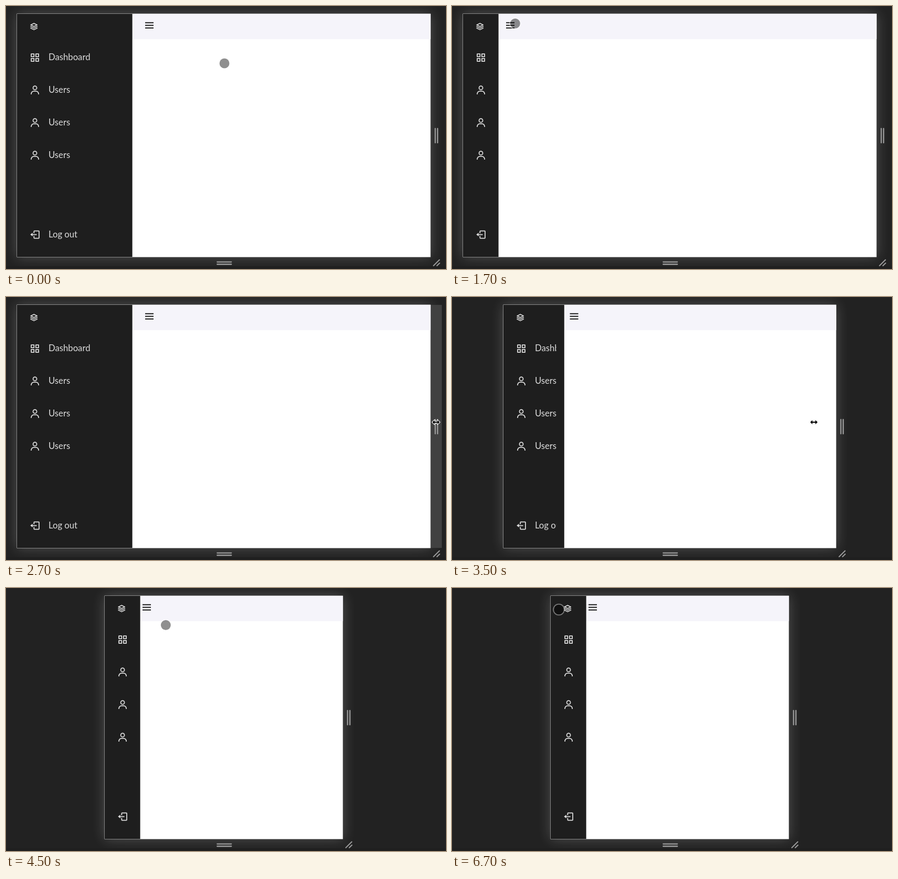
Recreate the animation shown at these times as an HTML page with a canvas. Size 838 by 500 pixels, loop 7.3 s.

```html
<!DOCTYPE html>
<html lang="en">
<head>
<meta charset="utf-8">
<title>Responsive sidebar</title>
<style>
  html, body { margin: 0; width: 100%; height: 100%; overflow: hidden; background: #222; }
  canvas { display: block; width: 838px; height: 500px; }
</style>
</head>
<body>
<canvas id="stage"></canvas>
<script>
const W = 838, H = 500, LOOP = 7300, STEP = 100;
const TOP = 15, BOTTOM = 477, BAR = 48, GRIP = 21, FLOOR = 495;
const EDGE = .4; // the page starts between two pixels
const DARK = '#1e1e1e', LIGHT = '#dcdcdc', METAL = '#9b9b9b';

const canvas = document.getElementById('stage');
const ctx = canvas.getContext('2d');
const dpr = window.devicePixelRatio || 1;
canvas.width = W * dpr;
canvas.height = H * dpr;

// 24-unit icons
const tile = (x, y) =>
  `M${x + 1} ${y}h6a1 1 0 0 1 1 1v6a1 1 0 0 1-1 1h-6a1 1 0 0 1-1-1v-6a1 1 0 0 1 1-1z` +
  `M${x + 2} ${y + 2}v4h4v-4z`;
const icons = {
  grid: new Path2D(tile(3, 3) + tile(13, 3) + tile(3, 13) + tile(13, 13)),
  user: new Path2D('M12 2a5 5 0 1 0 5 5 5 5 0 0 0-5-5zm0 8a3 3 0 1 1 3-3 3 3 0 0 1-3 3z' +
    'm9 11v-1a7 7 0 0 0-7-7h-4a7 7 0 0 0-7 7v1h2v-1a5 5 0 0 1 5-5h4a5 5 0 0 1 5 5v1z'),
  exit: new Path2D('M20 3h-9a2 2 0 0 0-2 2v4h2V5h9v14h-9v-4H9v4a2 2 0 0 0 2 2h9' +
    'a2 2 0 0 0 2-2V5a2 2 0 0 0-2-2zM2 12l5 4v-3h9v-2H7V8z'),
  menu: new Path2D('M4 6h16v2H4zM4 11h16v2H4zM4 16h16v2H4z')
};

const rowY = i => 98 + 62 * i;
const items = [
  ['grid', 'Dashboard', rowY(0)],
  ['user', 'Users', rowY(1)],
  ['user', 'Users', rowY(2)],
  ['user', 'Users', rowY(3)],
  ['exit', 'Log out', 434.5]
];

const mix = (a, b, p) => a + (b - a) * p;

function smooth(x) {
  const p = Math.min(1, Math.max(0, x));
  return p * p * (3 - 2 * p);
}

// CSS "ease": cubic-bezier(.25, .1, .25, 1)
function ease(x) {
  if (x <= 0) return 0;
  if (x >= 1) return 1;
  const bez = (a, b, u) => 3 * a * u * (1 - u) ** 2 + 3 * b * u * u * (1 - u) + u ** 3;
  let lo = 0, hi = 1;
  for (let i = 0; i < 24; i++) {
    const mid = (lo + hi) / 2;
    if (bez(.25, .25, mid) < x) lo = mid; else hi = mid;
  }
  return bez(.1, 1, lo);
}

// Each move: start, end, goal
const pointer = { from: [416, 109], curve: smooth, moves: [
  [0, 500, [265, 38]],
  [700, 900, [272, 38]],
  [1150, 1800, [110, 33]],
  [2000, 2700, [819, 238]],
  [3000, 3720, [652, 238]],
  [3900, 4650, [264, 51]],
  [4650, 5000, [260, 38]],
  [5400, 5980, [203.5, 41]]
] };

// Sidebar width and menu padding
const layout = { from: [220, 24], curve: ease, moves: [
  [1150, 1650, [68, 14]],
  [2050, 2550, [220, 24]],
  [3300, 3800, [68, 4]],
  [5000, 5400, [0, 4]],
  [6250, 6700, [68, 4]]
] };

const follow = ({ from, curve, moves }, t) => moves.reduce((now, [start, end, goal]) => {
  const p = curve((t - start) / (end - start));
  return now.map((v, i) => mix(v, goal[i], p));
}, from);

function rect(x, y, w, h, color) {
  ctx.fillStyle = color;
  ctx.fillRect(x, y, w, h);
}

function clipped(x, y, w, h, paint) {
  ctx.save();
  ctx.beginPath();
  ctx.rect(x, y, w, h);
  ctx.clip();
  paint();
  ctx.restore();
}

function icon(name, x, y, scale, color) {
  ctx.save();
  ctx.translate(x, y);
  ctx.scale(scale, scale);
  ctx.fillStyle = color;
  ctx.fill(icons[name], 'evenodd');
  ctx.restore();
}

function line(color, width, ...points) {
  ctx.strokeStyle = color;
  ctx.lineWidth = width;
  ctx.beginPath();
  points.forEach(([x, y]) => ctx.lineTo(x, y));
  ctx.stroke();
}

function layers(x, y) {
  ctx.lineJoin = 'round';
  ctx.lineCap = 'round';
  line(LIGHT, 1.7, [x - 6, y - 3], [x, y - 6], [x + 6, y - 3], [x, y], [x - 6, y - 3], [x, y - 6]);
  for (const d of [0, 3]) line(LIGHT, 1.6, [x - 6.2, y + d], [x, y + 3.1 + d], [x + 6.2, y + d]);
}

function frame(left, right, hover) {
  rect(0, 0, W, H, '#222');
  clipped(0, 0, right + GRIP, FLOOR, () => {
    ctx.shadowColor = 'rgba(255,255,255,.22)';
    ctx.shadowBlur = 24 * dpr;
    rect(left, TOP, right - left, BOTTOM - TOP, '#222');
  });
  rect(0, FLOOR, W, H - FLOOR, '#1f1f1f');
  if (hover) rect(right, TOP, GRIP, BOTTOM - TOP, '#414141');

  ctx.lineCap = 'round';
  for (const d of [8.5, 13]) line(METAL, 2.3, [right + d, 233], [right + d, 260]);
  for (const y of [486.6, 491]) line(METAL, 2.3, [402.2, y], [429.2, y]);
  line(METAL, 2, [right + 5.2, 493.8], [right + 16.5, 482.5]);
  line(METAL, 2, [right + 11.7, 493.8], [right + 16.8, 488.7]);
}

function page(left, right, main) {
  rect(left - EDGE, TOP - EDGE, right - left, BOTTOM - TOP + 2 * EDGE, '#fff');
  rect(main, TOP, right - EDGE - main, BAR, '#f5f4fa');
}

function sidebar(left, width) {
  rect(left, TOP, Math.max(0, width - EDGE), BOTTOM - TOP, DARK);
  clipped(left, TOP, width, BOTTOM - TOP, () => {
    layers(left + 32.2, 39);
    for (const [name, , y] of items) icon(name, left + 23.5, y - 10.5, .88, LIGHT);
  });
  clipped(left, TOP, Math.max(0, width - 15.5), BOTTOM - TOP, () => {
    ctx.font = '16.7px Lato, "Open Sans", sans-serif';
    ctx.fillStyle = LIGHT;
    for (const [, label, y] of items) ctx.fillText(label, left + 60, y + 5.4);
  });
}

function touch(x, y) {
  ctx.beginPath();
  ctx.arc(x, y, 9.5, 0, 7);
  ctx.fillStyle = 'rgba(0,0,0,.44)';
  ctx.fill();
  ctx.beginPath();
  ctx.arc(x, y, 10.4, 0, 7);
  ctx.strokeStyle = 'rgba(255,255,255,.4)';
  ctx.lineWidth = 1.8;
  ctx.stroke();
}

function resizer(x, y) {
  const upper = [[-7, 0], [-2.8, -4], [-2.8, -1], [2.8, -1], [2.8, -4], [7, 0]];
  const lower = upper.slice(1, -1).reverse().map(([a, b]) => [a, -b]);
  ctx.beginPath();
  upper.concat(lower).forEach(([a, b]) => ctx.lineTo(x + a, y + b));
  ctx.closePath();
  ctx.lineJoin = 'round';
  ctx.strokeStyle = '#fff';
  ctx.lineWidth = 2.4;
  ctx.stroke();
  ctx.fillStyle = '#000';
  ctx.fill();
}

function draw(t) {
  const inset = 167 * smooth((t - 3050) / 950);
  const left = 21 + inset, right = 809 - inset;
  const [px, py] = follow(pointer, t);
  const [side, pad] = follow(layout, t);
  const main = left + side - EDGE;
  const hover = px >= right && px <= right + GRIP;
  const dragging = t >= 3000 && t <= 3900;

  ctx.setTransform(dpr, 0, 0, dpr, 0, 0);
  frame(left, right, hover);
  page(left, right, main);
  sidebar(left, side);
  icon('menu', left + side + pad - 4, 24.7, 1, '#1c1c1c');
  (hover || dragging ? resizer : touch)(px, py);
}

const begin = performance.now();
function tick() {
  const t = (performance.now() - begin) % LOOP;
  draw(Math.floor(t / STEP) * STEP);
  requestAnimationFrame(tick);
}
tick();
</script>
</body>
</html>
```
